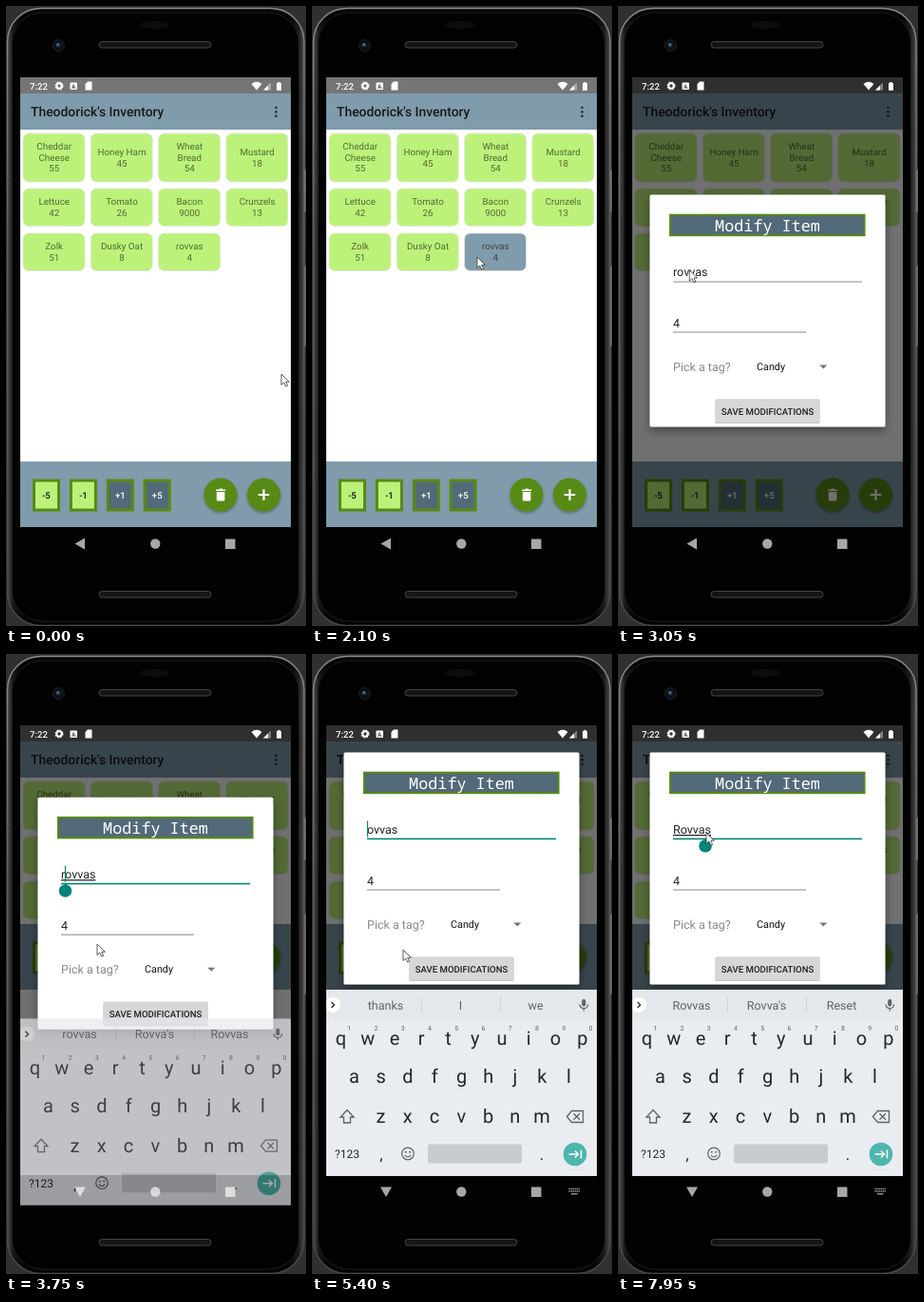
Animation, 316 px wide and 652 px high, one loop 8 s. Source, as an HTML page:

```html
<!DOCTYPE html>
<html lang="en">
<head>
<meta charset="utf-8">
<title>Inventory app</title>
<style>
html, body { margin: 0; width: 100%; height: 100%; overflow: hidden; background: #303030; }
svg { display: block; width: 316px; height: 652px; font-family: Roboto, sans-serif; text-rendering: geometricPrecision; }
.mono { font-family: "Noto Sans Mono", "DejaVu Sans Mono", monospace; }
</style>
</head>
<body>
<svg id="stage" viewBox="0 0 316 652">
  <defs>
    <linearGradient id="edge">
      <stop offset="0" stop-color="#4a4a4a"/><stop offset=".02" stop-color="#161616"/>
      <stop offset=".05" stop-color="#050505"/><stop offset=".95" stop-color="#050505"/>
      <stop offset=".98" stop-color="#1b1b1b"/><stop offset="1" stop-color="#4a4a4a"/>
    </linearGradient>
    <linearGradient id="rim" x2="0" y2="1">
      <stop offset="0" stop-color="#8a8a8a"/><stop offset=".35" stop-color="#606060"/><stop offset="1" stop-color="#484848"/>
    </linearGradient>
    <filter id="soft" x="-30%" y="-30%" width="160%" height="160%">
      <feDropShadow dx="0" dy="1.5" stdDeviation="1.5" flood-opacity=".35"/>
    </filter>
    <filter id="lift" x="-10%" y="-10%" width="120%" height="125%">
      <feDropShadow dx="0" dy="4" stdDeviation="5" flood-opacity=".4"/>
    </filter>
    <clipPath id="screen"><rect x="15" y="75" width="285" height="505"/></clipPath>
    <clipPath id="content"><rect id="contentClip" x="15" y="130" width="285" height="349"/></clipPath>
  </defs>
  <g id="phone"></g>
  <g clip-path="url(#screen)">
    <g id="app">
      <rect x="15" y="92" width="285" height="456" fill="#fff"/>
      <g id="header"></g>
      <g id="tiles" clip-path="url(#content)"></g>
      <g id="bar"></g>
    </g>
    <rect id="dim" x="15" y="92" width="285" height="456"/>
    <g id="status"></g>
    <g id="dialog"></g>
    <g id="keyboard"></g>
    <g id="nav" opacity=".65"></g>
  </g>
  <path id="pointer" d="M0 0V11.5L2.7 9 4.7 13.2 6.6 12.3 4.7 8.3H8.3Z" fill="#fff" stroke="#333" stroke-width=".8"/>
</svg>
<script>
const LOOP = 8000;
const LIME = '#bdf27a', GREEN = '#588a12', BLUE = '#809bab', SLATE = '#526a79', TEAL = '#008577';
const $ = id => document.getElementById(id);

function add(parent, tag, attrs, content) {
  const node = document.createElementNS('http://www.w3.org/2000/svg', tag);
  for (const key in attrs) node.setAttribute(key, attrs[key]);
  if (content !== undefined) node.textContent = content;
  $(parent).appendChild(node);
  return node;
}
const rect = (p, x, y, width, height, fill, more) => add(p, 'rect', { x, y, width, height, fill, ...more });
const circle = (p, cx, cy, r, fill, more) => add(p, 'circle', { cx, cy, r, fill, ...more });
const path = (p, d, fill, more) => add(p, 'path', { d, fill, ...more });
const line = (p, d, stroke, width = 1) => path(p, d, 'none', { stroke, 'stroke-width': width });
const text = (p, x, y, size, fill, str, more) => add(p, 'text', { x, y, 'font-size': size, fill, ...more }, str);
const MID = { 'text-anchor': 'middle' };
const BOLD = { 'font-weight': 500 };

function drawPhone() {
  rect('phone', 0, 0, 316, 652, '#303030');
  for (const [y, h] of [[172, 45], [273, 85]])
    rect('phone', 311, y, 5, h, '#888', { rx: 1.5, stroke: '#444' });
  rect('phone', 1.5, 2.5, 312.5, 649, 'url(#edge)', { rx: 35, stroke: 'url(#rim)', 'stroke-width': 1.4 });
  rect('phone', 6.5, 7, 302, 640, '#020202', { rx: 32, stroke: '#1c1c1c' });
  line('phone', 'M0 180H4M0 186H4', '#555');
  add('phone', 'ellipse', { cx: 156, cy: 20, rx: 16, ry: 4, fill: '#0c0c0c' });
  circle('phone', 55.5, 41.5, 6, '#0c1014', { stroke: '#1c2024' });
  circle('phone', 55, 41, 2.3, '#22415c');
  circle('phone', 54.5, 40.5, .8, '#9ab');
  for (const y of [37.5, 615.5])
    rect('phone', 98, y, 118, 6.5, '#151515', { rx: 3.2, stroke: '#444' });
}

function drawStatus() {
  rect('status', 15, 75, 285, 17, '#757575', { id: 'statusBg' });
  text('status', 25, 87.5, 9.6, '#fff', '7:22', BOLD);
  circle('status', 56, 84, 2.7, 'none', { stroke: '#fff', 'stroke-width': 2 });
  circle('status', 56, 84, 3.8, 'none', { stroke: '#fff', 'stroke-width': 1.4, 'stroke-dasharray': '1.6 1.4' });
  rect('status', 67.5, 80.5, 7.5, 7.5, '#fff', { rx: 1 });
  text('status', 71.2, 86.8, 6.5, '#555', 'A', { ...MID, 'font-weight': 700 });
  path('status', 'M83.5 82L86 79.5H90.5V88.5H83.5Z', '#fff');
  path('status', 'M258.5 82Q264 77.5 269.5 82L264 88.5Z', '#fff');
  path('status', 'M271 88.5L279 80.5V88.5Z', '#fff', { opacity: .4 });
  path('status', 'M271 88.5L276 83.5V88.5Z', '#fff');
  path('status', 'M285 81H286.3V80H288.7V81H290V88.8H285Z', '#fff');
}

function drawApp() {
  rect('header', 15, 92, 285, 38, BLUE);
  text('header', 26, 116, 13.9, '#151a1d', "Theodorick's Inventory", BOLD);
  for (const y of [106.8, 111.3, 115.8]) circle('header', 284.5, y, 1.4, '#30383d');

  const items = ['Cheddar,Cheese,55', 'Honey Ham,45', 'Wheat,Bread,54', 'Mustard,18', 'Lettuce,42', 'Tomato,26',
    'Bacon,9000', 'Crunzels,13', 'Zolk,51', 'Dusky Oat,8', 'rovvas,4'];
  const rows = [[134, 51], [192, 39.5], [239, 39.5]];
  items.forEach((item, i) => {
    const x = 18 + (i % 4) * 71.3, [y, h] = rows[i >> 2];
    rect('tiles', x, y, 65, h, LIME, { rx: 6, stroke: '#e2e8da', 'stroke-width': .8, id: 'tile' + i });
    const lines = item.split(',');
    lines.forEach((str, n) => text('tiles', x + 32.7, y + h / 2 + 3.3 + (n - (lines.length - 1) / 2) * 11.5,
      9.8, '#000', str, { ...MID, opacity: .56 }));
  });

  rect('bar', 15, 479, 285, 69, BLUE);
  ['-5', '-1', '+1', '+5'].forEach((str, i) => {
    const x = 29.5 + i * 38.9;
    rect('bar', x, 499, 26, 31, i < 2 ? LIME : SLATE, { stroke: GREEN, 'stroke-width': 3 });
    text('bar', x + 13, 518, 9.5, i < 2 ? '#111' : '#fff', str, { ...MID, ...BOLD });
  });
  for (const x of [226, 271.5]) circle('bar', x, 514, 17.5, GREEN, { filter: 'url(#soft)' });
  path('bar', 'M221 508.5H224L225 507.5H227.5L228.5 508.5H231.2V510H221ZM221.8 511H230.4V519.2Q230.4 520.5 229 520.5H223.2Q221.8 520.5 221.8 519.2Z', '#fff');
  line('bar', 'M265.7 514H277.3M271.5 508.2V519.8', '#fff', 2.2);
}

function drawDialog() {
  rect('dialog', 33.5, 198.5, 248, 244, '#fff', { rx: 1.5, filter: 'url(#lift)' });
  rect('dialog', 55, 219.7, 204.6, 21.5, SLATE, { stroke: GREEN, 'stroke-width': 2 });
  text('dialog', 157.5, 237, 16.8, '#fff', 'Modify Item', { ...MID, class: 'mono' });
  text('dialog', 58, 284, 12.5, '#222', 'rovvas', { id: 'field' });
  rect('dialog', 58, 289.5, 199, 1, '#888', { id: 'fieldLine' });
  rect('dialog', 0, 270.5, 1.2, 17, TEAL, { id: 'caret' });
  path('dialog', 'M0 289.5L4.9 292.1A6.8 6.8 0 1 1 -4.9 292.1Z', TEAL, { id: 'handle' });
  text('dialog', 58, 337.5, 12.5, '#222', '4');
  rect('dialog', 58, 342.5, 140, 1, '#888');
  text('dialog', 58, 384, 12.5, '#888', 'Pick a tag?');
  text('dialog', 146, 383, 10.8, '#111', 'Candy');
  path('dialog', 'M212.3 377.5H220.3L216.3 381.5Z', '#777');
  rect('dialog', 102.5, 414, 110, 25, '#bbb', { rx: 1.5 });
  rect('dialog', 102.5, 413.3, 110, 25, '#d6d7d7', { rx: 1.5 });
  text('dialog', 157.5, 429.8, 9.6, '#222', 'SAVE MODIFICATIONS', { ...MID, ...BOLD });
}

function drawKeyboard() {
  const ink = '#24282c', gray = '#5f6368', kb = 'keyboard';
  rect(kb, 15, 353, 285, 196, '#e9ecf0');
  rect(kb, 15, 353, 285, 31, '#e4e7eb');
  circle(kb, 22, 369, 8, '#fff');
  line(kb, 'M20.5 366L23.5 369L20.5 372', '#222', 1.3);
  for (let i = 0; i < 3; i++) text(kb, 77.5 + i * 79, 373.5, 12.5, gray, '', { ...MID, id: 'hint' + i });
  line(kb, 'M115.5 361V377M198.5 361V377', '#cfd2d6');
  rect(kb, 284.3, 363, 4, 7.5, gray, { rx: 2 });
  line(kb, 'M282 368.5A4.3 4.3 0 0 0 290.6 368.5M286.3 373V375.5', gray, 1.2);

  const rows = [['qwertyuiop', 30.5, 411], ['asdfghjkl', 44.5, 451], ['zxcvbnm', 72.5, 493]];
  rows.forEach(([keys, x, y], r) => [...keys].forEach((key, i) => {
    text(kb, x + i * 28.25, y, 20, ink, key, MID);
    if (!r) text(kb, x + 8.7 + i * 28.25, 396, 7, gray, (i + 1) % 10, MID);
  }));
  path(kb, 'M37 479.5L44 487H40.5V493H33.5V487H30Z', 'none', { stroke: gray, 'stroke-width': 1.3 });
  path(kb, 'M268.5 486.5L273.5 480.5H285.5V492.5H273.5Z', 'none', { stroke: gray, 'stroke-width': 1.3 });
  line(kb, 'M275.5 483.2L282 489.8M282 483.2L275.5 489.8', gray, 1.3);
  text(kb, 37, 530, 12, ink, '?123', MID);
  text(kb, 73, 532, 17, ink, ',', MID);
  text(kb, 242, 532, 17, ink, '.', MID);
  circle(kb, 101, 525.5, 6.3, 'none', { stroke: gray, 'stroke-width': 1.2 });
  for (const x of [98.8, 103.2]) circle(kb, x, 523.8, 1, gray);
  line(kb, 'M97.8 527Q101 531 104.2 527', gray, 1.2);
  rect(kb, 122, 515.5, 99, 20, '#c8cbcf', { rx: 2 });
  circle(kb, 277, 526, 12.3, '#4db6ac');
  line(kb, 'M270.5 526H280.5M277 522.5L280.5 526L277 529.5M283.5 521.5V530.5', '#fff', 1.5);
}

function drawNav() {
  path('nav', 'M72.5 565.5L83 559.5V571.5Z', '#fff', { id: 'back' });
  circle('nav', 157.3, 565.5, 5.2, '#fff');
  rect('nav', 231, 560.5, 10.5, 10.5, '#fff', { rx: .5 });
  add('nav', 'g', { id: 'imeIcon' });
  for (const y of [562.5, 565])
    path('imeIcon', `M270.5 ${y}H282`, 'none', { stroke: '#fff', 'stroke-width': 1.4, 'stroke-dasharray': '1.3 .7' });
  line('imeIcon', 'M273 567.8H279.5', '#fff', 1.3);
}

// Each track row: time, value, value...
const POINTER = [[0, 290, 387], [200, 290, 387], [850, 236, 322], [1500, 174, 264], [2600, 174, 264],
  [3150, 66, 279], [3450, 66, 279], [3720, 96, 305], [4300, 96, 305], [4600, 96, 311], [5500, 96, 311],
  [6200, 128, 238], [6900, 93, 188]];
const DIM = [[2150, 0], [2285, .56]];
const DIALOG_FADE = [[2150, 0], [2250, .97], [2300, 1]];
const DIALOG_Y = [[3650, 0], [3750, -47.5], [3900, -95]];
const KEYBOARD = [[3700, 62, 0], [3750, 31, .66], [3850, 0, 1]];
const CARET_ON = [[3500, 4050], [4550, 5000], [5350, 6100], [6600, 7100], [7150, 7700]];
// Editing states: start, text, caret x, handle shown, underlined, hints
const EDITS = [
  [0, 'rovvas', 62.5, false, false, ['rovvas', "Rovva's", 'Rovvas']],
  [3500, 'rovvas', 62.5, true, true, ['rovvas', "Rovva's", 'Rovvas']],
  [4800, 'ovvas', 58.5, false, false, ['thanks', 'I', 'we']],
  [5650, 'Rovvas', 66, false, false, ['Right', 'R', 'Re']],
  [7150, 'Rovvas', 92, true, true, ['Rovvas', "Rovva's", 'Reset']]
];

const smooth = u => u * u * (3 - 2 * u);
function sample(track, t, ease = u => u) {
  const next = track.findIndex(row => row[0] > t);
  if (next === 0) return track[0].slice(1);
  if (next < 0) return track.at(-1).slice(1);
  const a = track[next - 1], b = track[next], u = ease((t - a[0]) / (b[0] - a[0]));
  return a.slice(1).map((v, i) => v + (b[i + 1] - v) * u);
}
const set = (id, attrs) => { for (const key in attrs) $(id).setAttribute(key, attrs[key]); };
const show = (id, on) => set(id, { visibility: on ? 'inherit' : 'hidden' });

function render(t) {
  const [px, py] = sample(POINTER, t, smooth);
  set('pointer', { transform: `translate(${px} ${py})` });
  set('tile10', { fill: t >= 1950 && t < 2350 ? BLUE : LIME });

  const open = t >= 2150, resized = t >= 3700, focused = t >= 3500;
  set('dim', { opacity: sample(DIM, t)[0] });
  set('statusBg', { fill: open ? '#2f2f2f' : '#757575' });
  set('dialog', { opacity: sample(DIALOG_FADE, t)[0], transform: `translate(0 ${sample(DIALOG_Y, t)[0]})` });
  show('dialog', open);

  set('contentClip', { height: resized ? 154 : 349 });
  set('bar', { transform: `translate(0 ${resized ? -195 : 0})` });
  set('back', { transform: resized ? 'rotate(-90 78 565.5)' : '' });
  show('imeIcon', t >= 3800);
  const [ky, alpha] = sample(KEYBOARD, t);
  set('keyboard', { transform: `translate(0 ${ky})`, opacity: alpha });

  const [, word, x, handle, underlined, hints] = EDITS.findLast(edit => edit[0] <= t);
  $('field').textContent = word;
  $('field').style.textDecoration = underlined ? 'underline .8px' : 'none';
  $('field').style.textUnderlineOffset = '1px';
  set('fieldLine', focused ? { fill: TEAL, y: 288.6, height: 1.6 } : { fill: '#888', y: 289.5, height: 1 });
  set('caret', { x: x - .6 });
  show('caret', CARET_ON.some(([a, b]) => t >= a && t < b));
  set('handle', { transform: `translate(${x} 0)` });
  show('handle', handle);
  hints.forEach((hint, i) => { $('hint' + i).textContent = hint; });
}

[drawPhone, drawStatus, drawApp, drawDialog, drawKeyboard, drawNav].forEach(draw => draw());
const start = performance.now();
function tick() {
  render((performance.now() - start) % LOOP);
  requestAnimationFrame(tick);
}
tick();
</script>
</body>
</html>
```
